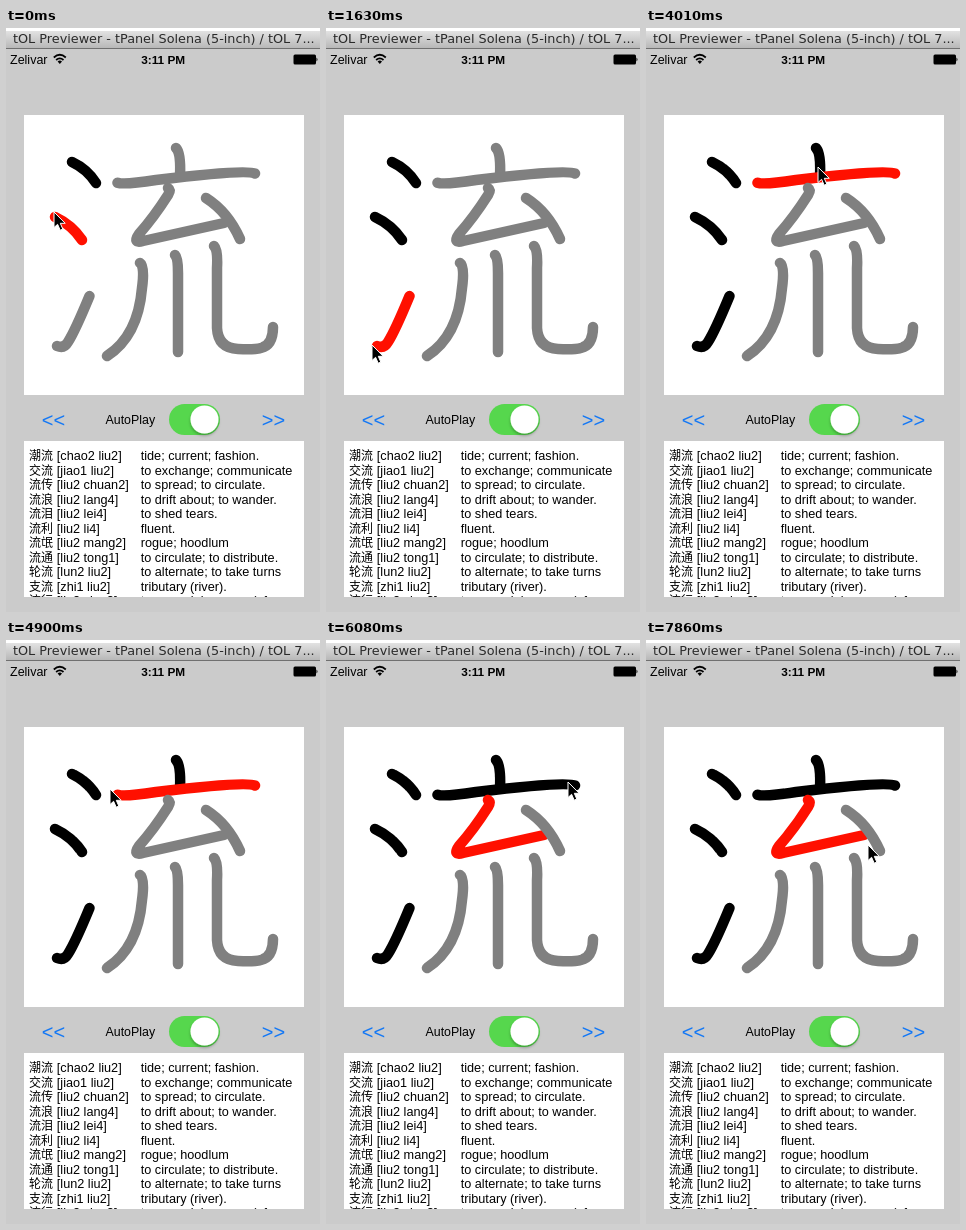
Animation of 314 by 584 pixels, one loop 8000 ms. Source, as an HTML page:

```html
<!DOCTYPE html>
<html lang="en">
<head>
<meta charset="utf-8">
<title>Stroke order</title>
<style>
  html, body { margin: 0; width: 100%; height: 100%; overflow: hidden; background: #cbcbcb; }
  svg { display: block; width: 314px; height: 584px; }
  text { font-family: "Liberation Sans", "Noto Sans CJK SC", "Noto Sans CJK", sans-serif; }
  #rows text { font-size: 12.7px; }
  #rows .han { font: 12px "Noto Sans CJK SC", "Noto Sans CJK", sans-serif; }
  #strokes path { fill: none; stroke-width: 10.5; stroke-linecap: round; stroke-linejoin: round; }
</style>
</head>
<body>
<svg viewBox="0 0 314 584">
  <defs>
    <linearGradient id="bar" x2="0" y2="1">
      <stop stop-color="#e2e2e2"/><stop offset="1" stop-color="#b8b8b8"/>
    </linearGradient>
    <clipPath id="panel"><rect x="18" y="413" width="280" height="156"/></clipPath>
    <filter id="shadow" x="-30%" y="-30%" width="160%" height="170%">
      <feDropShadow dx="0" dy="2" stdDeviation="1.5" flood-opacity=".3"/>
    </filter>
  </defs>

  <rect width="314" height="584" fill="#cbcbcb"/>
  <rect width="314" height="3" fill="#fff"/>
  <rect y="3" width="314" height="17" fill="url(#bar)"/>
  <rect y="20" width="314" height="1" fill="#707070"/>
  <text x="7" y="15" fill="#2a2a2a" style="font: 12.8px 'DejaVu Sans', sans-serif">tOL Previewer - tPanel Solena (5-inch) / tOL 7...</text>

  <text x="4" y="35.5" font-size="12.5">Zelivar</text>
  <g fill="none" stroke="#000" stroke-width="1.7">
    <path d="M47.8 29.5Q53.8 24 59.8 29.5M50.1 32Q53.8 28.6 57.5 32"/>
    <path d="M53.8 36L51.6 33.6Q53.8 31.6 56 33.6Z" fill="#000" stroke="none"/>
  </g>
  <text x="157.2" y="35.5" font-size="11.8" font-weight="bold" text-anchor="middle">3:11 PM</text>
  <rect x="287.5" y="26.5" width="22.5" height="10" rx="1.5"/>
  <path d="M310.5 29.5q2 2 0 4z"/>

  <rect x="18" y="87" width="280" height="280" fill="#fff"/>
  <g id="strokes"></g>

  <g font-size="20" fill="#1478f5" text-anchor="middle">
    <text x="47.5" y="399">&lt;&lt;</text>
    <text x="267.5" y="399">&gt;&gt;</text>
  </g>
  <text x="99.5" y="396" font-size="12.4">AutoPlay</text>
  <rect x="163" y="376" width="51" height="31" rx="15.5" fill="#56d74d"/>
  <circle cx="198.5" cy="391.5" r="14" fill="#fff" filter="url(#shadow)"/>

  <rect x="18" y="413" width="280" height="156" fill="#fff"/>
  <g id="rows" clip-path="url(#panel)"></g>

  <path id="cursor" d="M1 0V15.5L4.6 12.3L7.2 18.2L9.8 17.1L7.3 11.3H12.2Z" stroke="#fff"/>
</svg>
<script>
const LOOP = 8000, STEP = 148.4;

const words = [
  ["潮流", "chao2 liu2", "tide; current; fashion."],
  ["交流", "jiao1 liu2", "to exchange; communicate"],
  ["流传", "liu2 chuan2", "to spread; to circulate."],
  ["流浪", "liu2 lang4", "to drift about; to wander."],
  ["流泪", "liu2 lei4", "to shed tears."],
  ["流利", "liu2 li4", "fluent."],
  ["流氓", "liu2 mang2", "rogue; hoodlum"],
  ["流通", "liu2 tong1", "to circulate; to distribute."],
  ["轮流", "lun2 liu2", "to alternate; to take turns"],
  ["支流", "zhi1 liu2", "tributary (river)."],
  ["流行", "liu2 xing2", "to spread; in vogue (of"]
];

const outlines = [
  "M66 134Q81 141 90 155",
  "M49 189Q66 197 76 212",
  "M51 318Q58 321 62 314Q69 303 83.5 268",
  "M170 120Q175 125 174 148",
  "M111.5 154.7Q118 157 150 152Q240 141 249 145.5",
  "M162 160Q165 162 162 167Q148 189 133 206Q126 216 137 213Q200 199 218 195",
  "M200 170Q222 184 234 211",
  "M134 235Q139 238 136 260Q132 308 101 328",
  "M169 227Q172 230 172 245V324",
  "M208 218Q212 222 211 240V300Q212 320 232 321Q248 322 255 320Q267 317 267 299"
];

// Steps at which the next stroke becomes the active one.
const advances = [4, 18, 27, 41];

// Pointer path: step, x, y.
const pointer = [
  [0, 47, 184], [1, 50, 186], [4, 73, 208], [7, 71, 225], [8, 66, 243], [11, 45, 317],
  [12, 45, 317], [13, 49, 316], [14, 56, 309], [18, 82, 248], [20, 150, 139], [22, 165, 116],
  [23, 165, 116], [27, 171, 139], [28, 156, 142], [30, 92, 147], [31, 97, 149], [33, 103, 149],
  [39, 232, 145], [41, 241, 142], [44, 160, 156], [47, 130, 200], [49, 152, 203],
  [52, 211, 198], [53, 221, 205]
];

const $ = id => document.getElementById(id);

function add(parent, tag, attrs, text = "") {
  const el = document.createElementNS("http://www.w3.org/2000/svg", tag);
  for (const key in attrs) el.setAttribute(key, attrs[key]);
  el.textContent = text;
  return parent.appendChild(el);
}

words.forEach(([han, sound, meaning], i) => {
  const y = 432 + i * 14.5;
  add($("rows"), "text", { x: 23, y, class: "han" }, han);
  add($("rows"), "text", { x: 50.8, y }, `[${sound}]`);
  add($("rows"), "text", { x: 134.7, y }, meaning);
});

const strokes = outlines.map(d => add($("strokes"), "path", { d }));

function pointerAt(step) {
  const i = Math.max(1, pointer.findIndex(p => p[0] >= step));
  const [s0, x0, y0] = pointer[i - 1], [s1, x1, y1] = pointer[i];
  const k = (step - s0) / (s1 - s0);
  return [x0 + (x1 - x0) * k, y0 + (y1 - y0) * k].map(Math.round);
}

function draw(now) {
  const step = Math.min(53, Math.floor((now % LOOP + 6) / STEP));
  const active = 1 + advances.filter(s => step >= s).length;
  strokes.forEach((el, i) =>
    el.setAttribute("stroke", i < active ? "#000" : i === active ? "#ff1000" : "#808080"));
  $("cursor").setAttribute("transform", `translate(${pointerAt(step)})`);
  requestAnimationFrame(draw);
}
requestAnimationFrame(draw);
</script>
</body>
</html>
```
